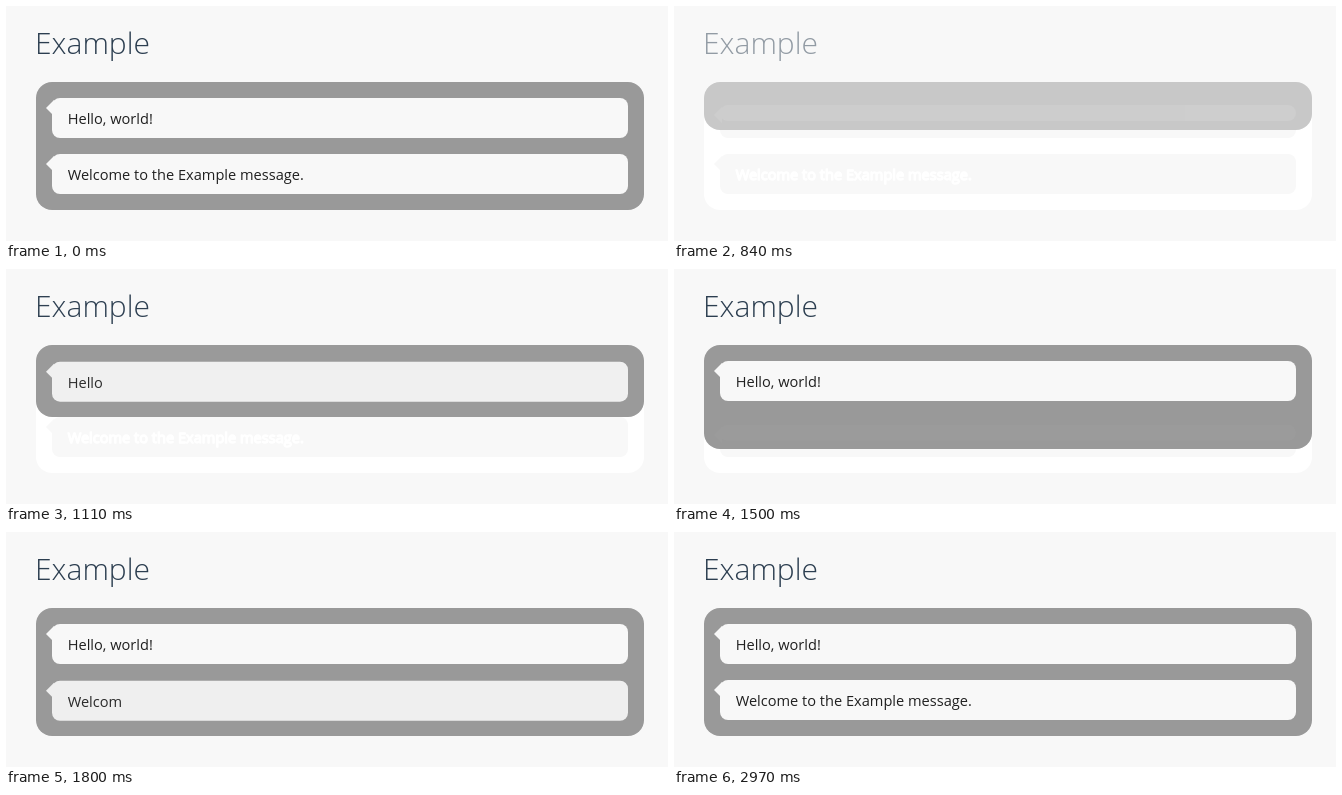
An HTML page that plays this animation: 662 px wide and 235 px high, repeating every 3570 ms.

```html
<!DOCTYPE html>
<html lang="en">
<head>
<meta charset="utf-8">
<title>Example</title>
<style>
  html, body { margin: 0; width: 100%; height: 100%; overflow: hidden; background: #f8f8f8; }
  svg { display: block; width: 662px; height: 235px; }
  text { font-family: "Open Sans", "Noto Sans", sans-serif; font-size: 14.6px; fill: #202020; }
  .title { font-size: 30px; font-weight: 300; fill: #2c3e50; }
  .panel { fill: #999; }
  .bubble, .backing { fill: #f8f8f8; }
  .blank .panel { fill: #fff; }
  .blank text { fill: #fff; stroke: #fff; stroke-width: 1.3px; stroke-linejoin: round; }
</style>
</head>
<body>
<svg id="stage" viewBox="0 0 662 235"></svg>
<script>
const LOOP = 3570, TICK = 30;
const BLANK_AT = 750, PAINT_AT = 840;
const FADE = 500, PANEL_START = 695;
const CHAR_MS = 47, RISE = 8;
const TOP = 76, PAD = 16, LINE = 24;

const messages = [
  { text: "Hello, world!", y: 92, start: 785, typeStart: 843 },
  { text: "Welcome to the Example message.", y: 148, start: 1482, typeStart: 1511 }
];

const stage = document.getElementById("stage");

function add(parent, tag, attrs = {}, content = "") {
  const el = document.createElementNS("http://www.w3.org/2000/svg", tag);
  for (const key in attrs) el.setAttribute(key, attrs[key]);
  el.textContent = content;
  return parent.appendChild(el);
}

const addPanel = (parent, cls) =>
  add(parent, "rect", { class: cls, x: 30, y: TOP, width: 608, height: 128, rx: 16 });

const addTitle = parent =>
  add(parent, "text", { class: "title", x: 29, y: 48 }, "Example");

function addBubble(parent, { text, y }) {
  const group = add(parent, "g");
  add(group, "path", { class: "bubble", d: `M40 ${y + 10}l8 -8v16z` });
  const box = add(group, "rect", { class: "bubble", x: 46, y, width: 576, height: 40, rx: 8 });
  const label = add(group, "text", { x: 61.7, y: y + 26 }, text);
  return { group, box, label };
}

// White silhouette that stays visible until the live panel covers it
const blank = add(stage, "g", { class: "blank" });
const blankTitle = addTitle(blank);
addPanel(blank, "panel");
messages.forEach(m => addBubble(blank, m));

const live = add(stage, "g");
const title = addTitle(live);
const backing = addPanel(live, "backing");
const card = add(live, "g");
const panel = addPanel(card, "panel");
const bubbles = messages.map(m => addBubble(card, m));

// cubic-bezier(.25, .1, .25, 1)
function ease(x) {
  if (x <= 0) return 0;
  if (x >= 1) return 1;
  const curve = (a, b, s) => 3 * a * s * (1 - s) ** 2 + 3 * b * s * s * (1 - s) + s ** 3;
  let lo = 0, hi = 1;
  for (let i = 0; i < 24; i++) {
    const mid = (lo + hi) / 2;
    if (curve(.25, .25, mid) < x) lo = mid; else hi = mid;
  }
  return curve(.1, 1, lo);
}

const show = (el, on) => el.setAttribute("display", on ? "inline" : "none");

function draw(t) {
  if (t < BLANK_AT) t += LOOP;
  const painted = t >= PAINT_AT;
  show(live, painted);
  show(blankTitle, !painted);
  if (!painted) return;

  const opacity = ease((t - PANEL_START) / FADE);
  title.setAttribute("opacity", opacity);
  card.setAttribute("opacity", opacity);

  let bottom = TOP + PAD;
  messages.forEach(({ text, y, start, typeStart }, i) => {
    const { group, box, label } = bubbles[i];
    const visible = t >= start;
    show(group, visible);
    if (!visible) return;
    const count = Math.max(0, Math.floor((t - typeStart) / CHAR_MS));
    const height = 16 + (count ? LINE : 0);
    const p = ease((t - start) / FADE);
    label.textContent = text.slice(0, count);
    box.setAttribute("height", height);
    group.setAttribute("opacity", p);
    group.setAttribute("transform", `translate(0 ${RISE * (1 - p)})`);
    bottom = y + height + PAD;
  });
  for (const el of [backing, panel]) el.setAttribute("height", bottom - TOP);
}

const began = performance.now();
function frame() {
  const t = (performance.now() - began) % LOOP;
  draw(Math.floor(t / TICK) * TICK);
  requestAnimationFrame(frame);
}
frame();
</script>
</body>
</html>
```
